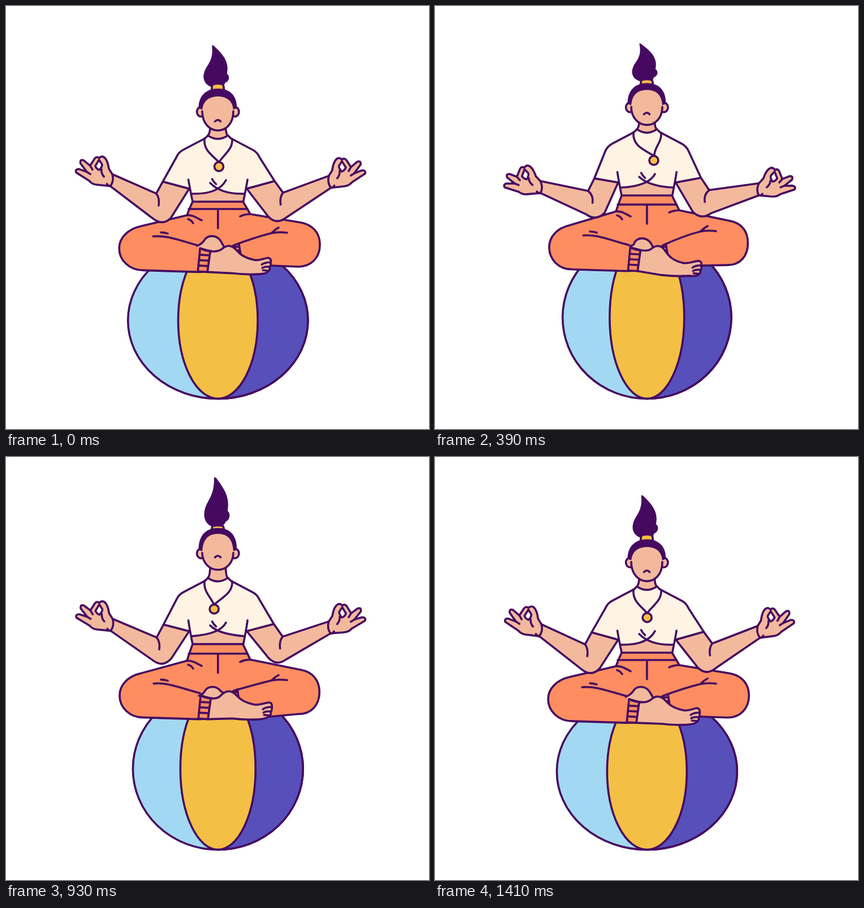
Write an HTML page with a canvas that moves like this. It is 748 by 748 pixels and loops after 1.44 s.

```html
<!DOCTYPE html>
<html lang="en">
<head>
<meta charset="utf-8">
<title>Balance</title>
<style>
html, body { margin: 0; width: 100%; height: 100%; overflow: hidden; background: #fff; }
canvas { display: block; width: 748px; height: 748px; }
</style>
</head>
<body>
<canvas id="stage" width="748" height="748"></canvas>
<script>
const ctx = document.getElementById('stage').getContext('2d');
const LOOP = 1440, STEP = 30, MID = 374.8;
const INK = '#450a60', SKIN = '#f3b99d', SHIRT = '#fff4e4', PANTS = '#ff8d62',
      GOLD = '#f4bf45', SKY = '#a3d8f2', VIOLET = '#5750ba';
let now = 0;

// Every moving value is a sine wave: mean, amplitude, time of its peak.
const wave = (mean, amp, peak) => mean + amp * Math.cos(2 * Math.PI * (now - peak) / LOOP);

function fill(d, color) {
  ctx.fillStyle = color;
  ctx.fill(new Path2D(d));
}
function line(d) {
  ctx.stroke(new Path2D(d));
}
function shape(d, color) {
  fill(d, color);
  line(d);
}
function oval(x, y, rx, ry, color) {
  ctx.beginPath();
  ctx.ellipse(x, y, rx, ry, 0, 0, 2 * Math.PI);
  ctx.fillStyle = color;
  ctx.fill();
  ctx.stroke();
}

function ball() {
  const rx = wave(152.5, 7.1, -82), ry = wave(141.8, -3.7, -82), y = 694.4 - ry;
  oval(MID, y, rx, ry, SKY);
  ctx.beginPath();
  ctx.ellipse(MID, y, rx, ry, 0, -Math.PI / 2, Math.PI / 2);
  ctx.fillStyle = VIOLET;
  ctx.fill();
  ctx.stroke();
  oval(MID, y, rx * 0.442, ry, GOLD);
}

function legs(waist) {
  const band = wave(352, 7, 0), hip = wave(364, 6, 0);
  const l = wave(464.2, 3.8, 130), r = wave(457.5, 3.6, 70);
  const lx = wave(201, 1.2, 550), rx = 755.2 - lx;
  const s = wave(1.3, 1.4, 550);

  shape(`M330 ${waist} L419 ${waist} Q427 ${band} 432 ${hip - 2} L522 ${r - 78}
    C543 ${r - 74} ${rx} ${r - 59} ${rx} ${r - 39} C${rx} ${r - 16} 540 ${r} 517 ${r}
    L468 459 L400 ${l} L340 ${l + 3} L243 ${l} C218 ${l} ${lx} ${l - 18} ${lx} ${l - 39}
    C${lx} ${l - 58} 216 ${l - 73} 238 ${l - 78} L320 ${hip} Q324 ${band} 330 ${waist} Z`, PANTS);
  line(`M323 ${band} L427 ${band} M${MID} ${band} V${band + 34}`);
  line(`M320 ${hip} C330 ${hip - 1} 338 ${hip + 5} 346 ${hip + 9}
    M322 ${hip + 7} Q327 ${hip + 8} 331 ${hip + 14} M432 ${hip - 2} Q422 ${hip - 2} 414 ${hip + 2}`);
  line(`M${260 + s} ${l - 60} C285 ${l - 62} 300 ${l - 55} 343 ${l - 43}
    M274 ${l - 67} Q280 ${l - 67} 286 ${l - 65}`);

  const ankle = wave(420.5, 6, 200), toe = wave(442.5, 9, 290), sole = wave(471.5, 7.3, 260);
  const tx = wave(470, 2, 600), rib = wave(411.5, 2.5, -100);
  line(`M402 ${ankle - 1} Q440 ${r - 52} 468 ${r - 59} Q480 ${r - 62} 497 ${r - 60}
    M470 ${r - 60} Q476 ${r - 66} 482 ${r - 69}`);
  line(`M${rib - 2} ${ankle - 4} L${rib + 1} ${ankle + 14} M398 ${ankle + 2} L${rib - 1} ${ankle + 1}
    M402 ${ankle + 9} L${rib} ${ankle + 8}`);

  // Back foot, ribbed cuff, then the front foot.
  const bx = wave(341.5, 5, 560), by = wave(423.5, 1.5, 250), top = wave(408, 3, 450);
  const heel = `M${bx} ${by} Q${bx + 8} ${by - 3} ${350 + s} ${top + 8}
    C${356 + s} ${top - 2.7} ${371 + s} ${top - 2.7} ${379 + s} ${top + 8} L387 ${ankle + 4}`;
  fill(`${heel} L370 ${l - 28} L345 ${l - 36} Z`, SKIN);
  line(heel);

  const cx = 343 + s, cy = l - 39;
  shape(`M${cx} ${cy} L${cx + 18} ${cy + 5} L${cx + 13} ${l + 3} L${cx - 4} ${l + 2} Z`, PANTS);
  for (let i = 1; i < 4; i++) {
    const y = cy + 2 + i * 9.5, x = cx - i;
    line(`M${x} ${y} L${x + 17} ${y + 1}`);
  }
  shape(`M${cx + 13} ${l + 3} L${cx + 18} ${cy + 5} Q${cx + 30} ${cy + 7} 381 ${ankle + 6}
    Q388 ${ankle - 1} 396 ${ankle} C410 ${ankle + 2} 406 ${toe - 3} 440 ${toe + 4}
    C450 ${toe + 5} 456 ${toe + 1} ${tx - 5} ${toe} Q${tx + 1} ${toe + 1} ${tx} ${toe + 8}
    Q${tx} ${toe + 15} ${tx - 2} ${toe + 17} Q${tx - 1} ${toe + 22} ${tx - 5} ${toe + 24}
    Q${tx - 7} ${toe + 28} 448 ${sole - 0.5} Q425 ${sole + 1} 400 ${sole - 2} Z`, SKIN);
  line(`M${cx} ${cy} Q${cx + 9} ${cy + 5} ${cx + 20} ${cy + 5}
    M${tx} ${toe + 8} Q${tx - 11} ${toe + 8} ${tx - 16} ${toe + 12}
    M${tx - 2} ${toe + 16} Q${tx - 11} ${toe + 15} ${tx - 15} ${toe + 18}
    M${tx - 5} ${toe + 23} L${tx - 14} ${toe + 22}`);
}

function hand(x, y, angle) {
  const droop = wave(1.5, 1.5, 520);
  ctx.save();
  ctx.translate(x, y);
  ctx.rotate(angle);
  ctx.translate(-184, -320);
  shape(`M188 299 L182 289 Q180 272 173 268 Q169 266 165 270 Q161 266 157 271 L149 283
    L138 ${273 + droop} Q131 ${270 + droop} 132 ${278 + droop} L143 294 L129 ${288 + droop}
    Q122 ${288 + droop} 124 ${294 + droop} L147 310 Q152 316 160 317 L184 320`, SKIN);
  line('M149 283 L153 290 M143 294 L149 298 M169 290 Q168 297 173 303');
  shape('M165 273 L158 284 Q161 290 165 291 Q171 285 170 281 Z', '#fff');
  line('M188 299 Q191 311 184 320 Q180 320 178 316');
  ctx.restore();
}

// Draws one arm with its half of the shirt; the right side is mirrored.
function side(waist, right) {
  const k = right ? 1 : 0;
  ctx.save();
  if (right) {
    ctx.translate(2 * MID, 0);
    ctx.scale(-1, 1);
  }
  const sx = wave(279.2, 3.1, 520) - 2.5 * k, sy = wave(303, 8, 80) - k;
  const crookX = wave(267.6, 3.5, 490) - 6 * k, crookY = wave(325.2, 7, 90) - 1.5 * k;
  const outX = wave(263, 5.3, 480) - 6 * k, outY = wave(367.5, 9, 60) - 2 * k;
  const inX = wave(294.5, 6, 480) - 6 * k, inY = wave(364.5, 10.5, 50) - 2 * k;
  const wx = wave(185.5, 1.5, 520) - 9.5 * k, wy = wave(318 + 4 * k, 13, 350 + 20 * k);
  const turn = wave(-4.8, 7.8, 1190 + 20 * k) * Math.PI / 180;
  const topX = wx + 4 * Math.cos(turn) + 21 * Math.sin(turn);
  const topY = wy + 4 * Math.sin(turn) - 21 * Math.cos(turn);
  const hemY = waist - 23, bend = wave(6.5, 2.5, 480);

  const arm = `M${topX} ${topY} L${crookX} ${crookY} L${sx} ${sy} L324 ${hemY} L${inX} ${inY}
    Q${(outX + inX) / 2 + 1} ${(outY + inY) / 2 + 14} ${outX} ${outY} L${wx} ${wy}`;
  shape(arm, SKIN);
  line(`M${crookX} ${crookY} Q${crookX + bend + 1} ${crookY + 8} ${crookX + bend - 1} ${crookY + 21}`);
  hand(wx, wy, turn);

  const sleeve = `L352 ${waist - 112} L314 ${waist - 92} Q305 ${waist - 87.5} 301 ${waist - 78}
    L${sx} ${sy} L324 ${hemY}`;
  fill(`M376 ${waist - 113} L357 ${waist - 117} ${sleeve} L329 ${waist - 14}
    Q360 ${waist - 15} 376 ${waist - 23} Z`, SHIRT);
  line(`M357 ${waist - 117} ${sleeve}`);
  line(`M322.5 ${wave(295.5, 11.5, -10)} Q325 ${waist - 24} 330 ${waist}`);
  ctx.restore();
}

function chest(waist) {
  const arch = waist + wave(-15.5, 2.5, 0);
  line(`M329 ${waist - 14} C365 ${arch} 382 ${waist - 25} 389 ${waist - 38}
    M421 ${waist - 14} C388 ${arch} 371 ${waist - 23} 361 ${waist - 33}
    M364.5 ${waist - 40} Q367 ${waist - 35} 371.5 ${waist - 31}`);
  const px = wave(376.5, 10.5, 360), py = waist - 62;
  line(`M351 ${waist - 112} C349 ${waist - 92} 362 ${waist - 84} ${px - 1} ${py - 9}
    M400 ${waist - 111} C401 ${waist - 93} 388 ${waist - 86} ${px + 1} ${py - 9}`);
  oval(px, py, 8, 8, GOLD);
}

function hair(base) {
  const x = wave(366.7, 3.6, 1040), y = wave(55.5, 19.5, 170);
  const h = (base - y) / 71, d = (x - 367) * 0.3;
  const at = (px, up) => `${px + d} ${base - up * h}`;
  fill(`M${x - 2} ${y} Q${x} ${y - 1} ${x + 2} ${y + 1} C${at(381, 58)} ${at(396, 44)} ${at(391, 21)}
    C${at(397, 17)} ${at(395, 7)} ${at(388, 5)} Q386 ${base + 1} 380 ${base + 3} L366 ${base + 3}
    C${at(355, -1)} ${at(346, 9)} ${at(351, 24)} C${at(355, 37)} ${at(368, 44)} ${x - 2} ${y} Z`, INK);
}

function head(waist) {
  const nod = (mean, amp) => wave(mean, amp, 60);
  const chin = nod(210.3, 11.7), ear = nod(178, 9.3), brow = nod(146.8, 13.6);
  const cap = nod(134.8, 11.7), mouth = nod(188, 15.2), band = nod(130, 9.3);

  shape(`M361 ${chin - 8} Q361 ${waist - 121} 357 ${waist - 117} Q${MID} ${waist - 105} 392 ${waist - 117}
    Q388.5 ${waist - 121} 388.5 ${chin - 8}`, SKIN);

  hair(chin - 81);
  shape(`M364 ${cap + 4} Q363 ${band - 1} 368 ${band - 1} Q${MID} ${band - 2.5} 381 ${band - 1}
    Q386 ${band - 1} 385 ${cap + 4} Z`, GOLD);

  for (const x of [345, 404.5]) oval(x, ear, 7.5, 8.5, SKIN);
  const low = ear - 6;
  fill(`M340.5 ${low} C340 ${cap + 13} 354 ${cap} ${MID} ${cap} S409 ${cap + 13} 408 ${low}
    L402 ${low + 2} L347 ${low + 2} Z`, INK);
  fill(`M347 ${ear} C347 ${brow + 9} 358 ${brow} ${MID} ${brow} S402 ${brow + 9} 402 ${ear}
    C400 ${chin - 11} 387 ${chin - 1} ${MID} ${chin - 1} S349 ${chin - 11} 347 ${ear} Z`, SKIN);
  line(`M347 ${ear - 1} C347 ${chin - 13} 361 ${chin - 1.5} ${MID} ${chin - 1.5}
    S402 ${chin - 13} 402 ${ear - 1}`);
  line(`M369.5 ${mouth + 1.5} Q${MID} ${mouth - 4} 379.5 ${mouth + 1.5}`);
}

function draw() {
  const waist = wave(336.5, 9.5, -5);
  ctx.fillStyle = '#fff';
  ctx.fillRect(0, 0, 748, 748);
  ctx.strokeStyle = INK;
  ctx.lineWidth = 3.6;
  ctx.lineCap = ctx.lineJoin = 'round';
  ball();
  fill(`M325 ${waist - 30} L330 ${waist} H419 L425 ${waist - 30} Z`, SKIN);
  legs(waist);
  side(waist, false);
  side(waist, true);
  chest(waist);
  head(waist);
}

function frame() {
  now = Math.floor(performance.now() % LOOP / STEP) * STEP;
  draw();
  requestAnimationFrame(frame);
}
frame();
</script>
</body>
</html>
```
